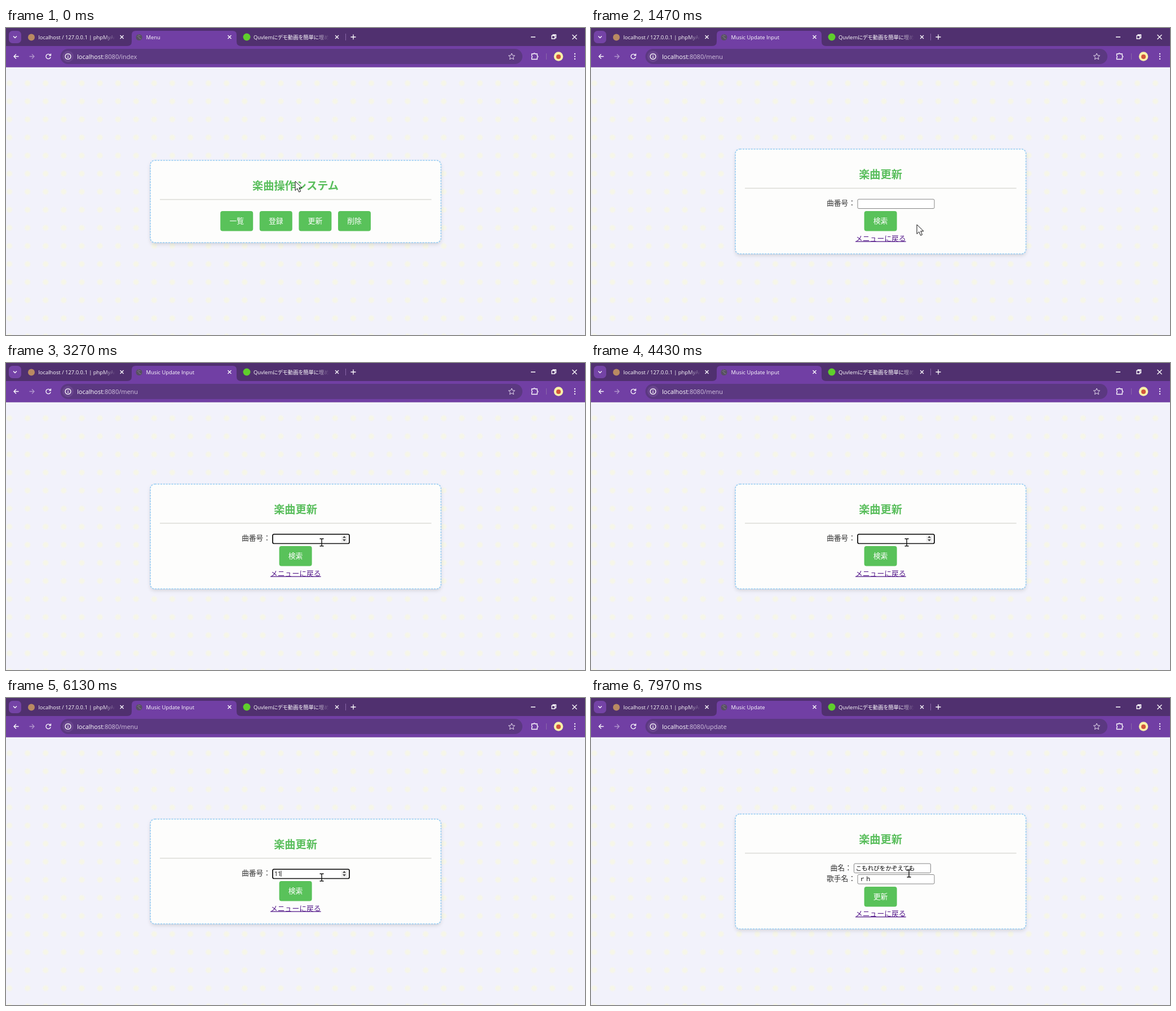
Write an HTML page that moves like this. It is 1027x545 px and loops after 8000 ms.

```html
<!DOCTYPE html>
<html lang="ja">
<head>
<meta charset="utf-8">
<style>
html, body { margin: 0; width: 100%; height: 100%; overflow: hidden; background: #f2f2fb; }
svg { display: block; width: 100vw; height: 100vh; }
text { font-family: "Noto Sans CJK JP", "Noto Sans CJK", sans-serif; font-size: 12.8px; fill: #333; white-space: pre; }
.ui { font-family: "Open Sans", "Noto Sans CJK JP", "Noto Sans CJK", sans-serif; font-size: 9.4px; fill: #fff; font-feature-settings: "palt"; }
.url { font-size: 11px; fill: #d2c3df; }
.url .host { fill: #fff; }
.head { font-size: 19.2px; font-weight: 700; fill: #59be5c; text-anchor: middle; }
.btn { fill: #fff; text-anchor: middle; }
.link { fill: #551a8b; text-decoration: underline; }
.val { font-family: "Open Sans", "Noto Sans CJK JP", "Noto Sans CJK", sans-serif; font-size: 10.6px; fill: #000; }
.icon { fill: none; stroke: #fff; stroke-width: 1.3; }
</style>
</head>
<body>
<svg viewBox="0 0 1027 545" preserveAspectRatio="none">
  <defs>
    <pattern id="dots" x="-10" y="82" width="32.1" height="32.1" patternUnits="userSpaceOnUse">
      <circle cx="16" cy="16" r="6.5" fill="url(#dot)"/>
    </pattern>
    <radialGradient id="dot">
      <stop offset=".5" stop-color="#f6f6e8"/>
      <stop offset="1" stop-color="#f6f6e8" stop-opacity="0"/>
    </radialGradient>
    <linearGradient id="fade" gradientUnits="userSpaceOnUse" x1="550" x2="573">
      <stop offset="0" stop-color="#fff"/><stop offset="1" stop-color="#fff" stop-opacity="0"/>
    </linearGradient>
    <linearGradient id="fade1" gradientUnits="userSpaceOnUse" x1="172" x2="194">
      <stop offset="0" stop-color="#fff"/><stop offset="1" stop-color="#fff" stop-opacity="0"/>
    </linearGradient>
    <filter id="shadow" x="-5%" y="-10%" width="110%" height="125%">
      <feDropShadow dx="0" dy="3.2" stdDeviation="3.2" flood-color="#000" flood-opacity=".13"/>
    </filter>
  </defs>

  <rect width="1027" height="545" fill="#f2f2fb"/>
  <rect y="70" width="1027" height="475" fill="url(#dots)"/>

  <rect width="1027" height="33" fill="#50306f"/>
  <rect y="32" width="1027" height="37.5" fill="#713fa4"/>
  <rect y="69" width="1027" height="1" fill="#8f6bb5"/>
  <path d="M215 32q8 0 8-8V12q0-7 7-7h172q7 0 7 7v12q0 8 8 8z" fill="#713fa4"/>
  <rect x="5" y="5" width="22" height="22" rx="6.5" fill="#7443a6"/>
  <path class="icon" d="M13 14.5l3 3 3-3"/>

  <circle cx="45" cy="16.5" r="6" fill="#b98a62"/>
  <circle cx="236" cy="16.5" r="5.5" fill="#565060"/>
  <path d="M232.5 14.5q3 .5 3.5 2.5t3.5 2M234.5 12q1 2 4 1.500" fill="none" stroke="#7b7484" stroke-width="1.2"/>
  <circle cx="427" cy="16" r="6.5" fill="#5fce2c"/>
  <text class="ui" x="57.500" y="20" style="fill:url(#fade1)">localhost / 127.0.0.1 | phpMyAd</text>
  <text class="ui" id="title" x="248.500" y="20"></text>
  <text class="ui" x="439" y="20" style="fill:url(#fade)">Quvlemにデモ動画を簡単に埋め込</text>
  <g id="closers" class="icon"></g>
  <path d="M602.500 10v12M958.500 45v11" stroke="#8a67a9" fill="none"/>
  <path class="icon" d="M611.500 16h9M616 11.500v9"/>
  <path class="icon" stroke-width="1" d="M931 16h8M968 13.500h5.500v5.500H968zM970 13.500V12h5.500v5.500H974M1004.500 12l8 8m0-8l-8 8"/>

  <path class="icon" d="M22.500 50.500H14M18 46.500l-4 4 4 4"/>
  <path class="icon" opacity=".45" d="M41.500 50.500H50M46 46.500l4 4-4 4"/>
  <path class="icon" d="M78.500 48a4.200 4.200 0 1 0 .7 3.500M79.500 45.500v3.300h-3.300"/>
  <rect x="96.500" y="37" width="819.500" height="27" rx="13.500" fill="#5b3881"/>
  <circle cx="110" cy="50.500" r="10" fill="#69458d"/>
  <circle class="icon" cx="110" cy="50.500" r="4.900" stroke-width="1"/>
  <path class="icon" d="M110 50v3.200M110 47.600v1.200"/>
  <text class="ui url" x="126" y="54.500"><tspan class="host">localhost</tspan><tspan id="path"></tspan></text>
  <path class="icon" style="stroke:#e6dcef;stroke-width:1" d="M897 45l1.600 3.700 4 .3-3 2.700.9 4-3.500-2.100-3.500 2.100.9-4-3-2.700 4-.3z"/>
  <path class="icon" d="M932.500 46h3.300a1.300 1.300 0 0 1 2.600 0h3.800v3.500a1.300 1.300 0 0 1 0 2.800v3.200h-9.700v-3.200a1.500 1.500 0 0 0 0-2.800z"/>
  <circle cx="980" cy="50.500" r="8.200" fill="#f8f0a8"/>
  <circle cx="980" cy="51" r="4" fill="#d2553a"/>
  <g fill="#fff"><circle cx="1009" cy="46" r="1.150"/><circle cx="1009" cy="50.500" r="1.150"/><circle cx="1009" cy="55" r="1.150"/></g>

  <g id="pages"></g>

  <g id="spinner">
    <rect x="594.500" y="305.500" width="11.500" height="13" fill="#efefef"/>
    <path d="M597 310.500l3-3.500 3 3.500zM597 313l3 3.500 3-3.500z" fill="#444"/>
  </g>
  <rect id="ring" x="473" y="304" width="136" height="16.500" rx="2.500" fill="none" stroke="#101010" stroke-width="1.700"/>
  <text id="typed" class="val" x="476" y="315.500"></text>
  <path id="caret" d="M0 306.500v10.500" stroke="#000" stroke-width=".9"/>

  <g id="arrow">
    <path d="M0 0v16.500l3.900-3.700 2.700 6.400 2.900-1.200-2.700-6.300H12z" fill="#fff" stroke="#111" stroke-linejoin="round"/>
  </g>
  <g id="beam">
    <path d="M-3.500-6.500h2.500l1 1 1-1h2.500M0-5.500v11M-3.500 6.500h2.500l1-1 1 1h2.500" fill="none" stroke="#111" stroke-width="1.400"/>
  </g>
  <g id="hand">
    <path d="M-1.500 10V1q0-1.500 1.500-1.500T1.500 1v5q2.500-1.300 3 .5 2.300-.8 2.500.8 2.200-.3 2.200 1.700v3.500q0 2.500-1.500 4.500H.5Q-2 13.500-4.200 10.500q-.7-2.200 1.200-1.800z" fill="#fff" stroke="#111" stroke-linejoin="round"/>
    <path d="M1.500 6v3.500M4.500 6.800v3M7 7.500v2.500" stroke="#111" stroke-width=".8"/>
  </g>
</svg>
<script>
const LOOP = 8000, CLICK_FIELD = 2600, KEYS = [5450, 5700], CLICK_SEARCH = 6850;
const $ = id => document.getElementById(id);
const show = (el, on) => el.setAttribute('display', on ? 'inline' : 'none');

const label = (x, y, s, cls = '') => `<text class="${cls}" x="${x}" y="${y}">${s}</text>`;
const field = f => `<rect x="${f.x}" y="${f.y}" width="136" height="16.5" rx="2" fill="#fff" stroke="#767676" stroke-width=".9"/>`
  + label(f.x + 3, f.y + 11.5, f.text || '', 'val');
const button = b => `<rect class="face" x="${b.x}" y="${b.y}" width="58" height="35.5" rx="4"/>`
  + label(b.x + 29, b.y + 21.7, b.text, 'btn');

const menuButtons = ['一覧', '登録', '更新', '削除'].map((text, i) => ({ x: 380.2 + i * 69.6, y: 325, text }));
const back = y => ({ x: 469, y, text: 'メニューに戻る' });

const pages = [
  { from: 0, title: 'Menu', path: '/index', top: 235, bottom: 381, head: '楽曲操作システム',
    labels: [], fields: [], buttons: menuButtons },
  { from: 1100, title: 'Music Update Input', path: '/menu', top: 215, bottom: 401, head: '楽曲更新',
    labels: [[418, 315, '曲番号：']], fields: [{ x: 473, y: 304 }],
    buttons: [{ x: 484.6, y: 325, text: '検索' }], link: back(377.5) },
  { from: 7150, title: 'Music Update', path: '/update', top: 206, bottom: 410, head: '楽曲更新',
    labels: [[424.500, 305.500, '曲名：'], [418, 325, '歌手名：']],
    fields: [{ x: 466.5, y: 294, text: 'こもれびをかぞえても' }, { x: 473, y: 313.5, text: 'ｒｈ' }],
    buttons: [{ x: 484.6, y: 335, text: '更新' }], link: back(387) }
];

for (const p of pages) {
  const box = `x="256" y="${p.top}" width="515.5" height="${p.bottom - p.top}" rx="8"`;
  const g = document.createElementNS('http://www.w3.org/2000/svg', 'g');
  g.innerHTML = `<rect ${box} fill="#fdfdfc" filter="url(#shadow)"/>`
    + `<rect ${box} fill="none" stroke="#97cdf3" stroke-width="1.6" stroke-dasharray="3.2 1.7"/>`
    + label(513.5, p.top + 52, p.head, 'head')
    + `<rect x="273" y="${p.top + 68.7}" width="481.500" height="1.6" fill="#dcdcd8"/>`
    + p.labels.map(l => label(...l)).join('')
    + p.fields.map(field).join('') + p.buttons.map(button).join('')
    + (p.link ? label(p.link.x, p.link.y, p.link.text, 'link') : '');
  $('pages').append(g);
  p.el = g;
  p.faces = [...g.querySelectorAll('.face')];
}
$('closers').innerHTML = [205.5, 396.5, 587].map(x => `<path d="M${x - 3} 13l6 6m0-6l-6 6"/>`).join('');

// pointer stops: time, x, y
const stops = [
  [150, 513, 272], [750, 556, 345], [1230, 556, 345], [1450, 578, 349],
  [1750, 578, 349], [2350, 560, 318.5], [6220, 560, 318.5], [6650, 536, 353],
  [7350, 536, 353], [7800, 564, 311.5]
];

function pointer(t) {
  const i = stops.findIndex(s => s[0] > t);
  if (i === 0) return stops[0].slice(1);
  if (i < 0) return stops[stops.length - 1].slice(1);
  const [a, b] = [stops[i - 1], stops[i]];
  const u = (t - a[0]) / (b[0] - a[0]), e = u * u * (3 - 2 * u);
  return [a[1] + (b[1] - a[1]) * e, a[2] + (b[2] - a[2]) * e];
}

const hits = (r, w, h, x, y) => x >= r.x && x <= r.x + w && y >= r.y && y <= r.y + h;

function draw(t) {
  const page = pages.filter(p => t >= p.from).pop();
  const [x, y] = pointer(t);
  pages.forEach(p => show(p.el, p === page));
  $('title').textContent = page.title;
  $('path').textContent = ':8080' + page.path;

  let kind = 'arrow';
  page.buttons.forEach((b, i) => {
    const over = hits(b, 58, 35.5, x, y);
    if (over) kind = 'hand';
    page.faces[i].setAttribute('fill', over ? '#4cae50' : '#59c25a');
  });
  const link = page.link;
  if (link && hits({ x: link.x, y: link.y - 12 }, 90, 16, x, y)) kind = 'hand';
  const overField = page.fields.some(f => hits(f, 136, 18, x, y));
  if (overField) kind = 'beam';

  const search = page === pages[1];
  const focus = search && t >= CLICK_FIELD && t < CLICK_SEARCH;
  const typed = search ? KEYS.filter(k => t >= k) : [];
  const lastAction = typed.length ? typed[typed.length - 1] : CLICK_FIELD;
  show($('ring'), focus);
  show($('spinner'), search && (focus || overField));
  $('typed').textContent = '1'.repeat(typed.length);
  show($('caret'), focus && (t - lastAction) % 1000 < 500);
  $('caret').setAttribute('transform', `translate(${476.3 + typed.length * 5.8})`);

  for (const id of ['arrow', 'beam', 'hand']) {
    show($(id), id === kind);
    $(id).setAttribute('transform', `translate(${x} ${y})`);
  }
}

const start = performance.now();
function tick() {
  draw((performance.now() - start) % LOOP);
  requestAnimationFrame(tick);
}
draw(0);
requestAnimationFrame(tick);
</script>
</body>
</html>
```
